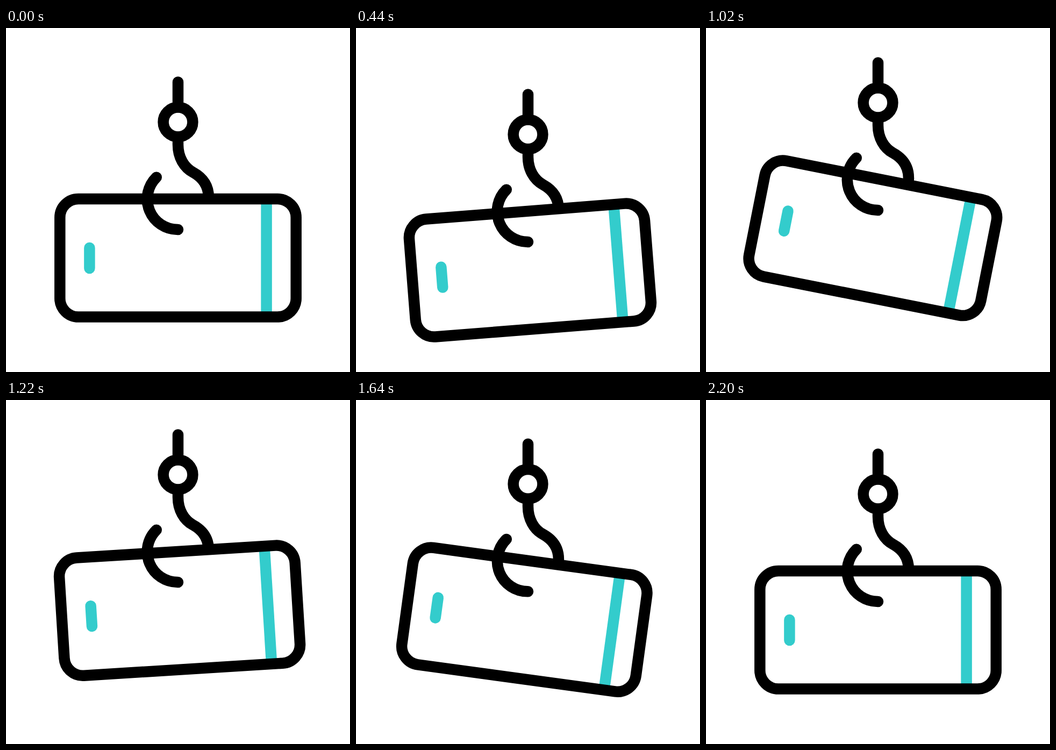
An HTML page that plays this animation: 640x640 px, repeating every 2400 ms.

```html
<!DOCTYPE html>
<html lang="en">
<head>
<meta charset="utf-8">
<title>Hooked phone</title>
<style>
  html, body { margin: 0; width: 100%; height: 100%; overflow: hidden; background: #fff; }
  svg { display: block; width: 100%; height: 100%; }
</style>
</head>
<body>
<svg viewBox="0 0 640 640" fill="none" stroke="#000" stroke-width="20.5" stroke-linecap="round">
  <g id="scene">
    <path d="M320 100.5V147"/>
    <circle cx="320" cy="175" r="27.4"/>
    <path d="M320 203V217C320 240 331 259.5 348 268.5C368 279.5 376.9 296 376.9 315V318"/>
    <g id="phone">
      <rect x="100.3" y="318" width="439.4" height="219.5" rx="34.5" fill="#fff" stroke="none"/>
      <path d="M484.6 318V537.5" stroke="#3cc" stroke-linecap="butt"/>
      <path d="M155.4 409V447" stroke="#3cc"/>
      <rect x="100.3" y="318" width="439.4" height="219.5" rx="34.5"/>
    </g>
    <path d="M279.8 277.7A56.8 56.8 0 0 0 320 375"/>
  </g>
</svg>
<script>
const LOOP = 2400, STEP = 20;
const scene = document.getElementById('scene');
const phone = document.getElementById('phone');

// Smooth step from 0 to 1 between two times
function ramp(t, from, to) {
  const u = Math.min(1, Math.max(0, (t - from) / (to - from)));
  return u * u * (3 - 2 * u);
}

function draw() {
  const t = Math.floor(performance.now() % LOOP / STEP) * STEP;
  const dip = ramp(t, 200, 500), pull = ramp(t, 500, 900);
  const drop = ramp(t, 1500, 1900), settle = ramp(t, 1900, 2200);
  const lean = ramp(t, 500, 1100);
  const swing = ramp(t, 1300, 1500) - ramp(t, 1100, 1300);

  const lift = 25.6 * (dip - settle) + 61.6 * (drop - pull);
  const tilt = -5 * dip + 17 * lean + 24 * swing - 15 * drop + 3 * settle;
  scene.setAttribute('transform', `translate(0 ${lift})`);
  phone.setAttribute('transform', `rotate(${tilt} 320 378)`);
  requestAnimationFrame(draw);
}
draw();
</script>
</body>
</html>
```
